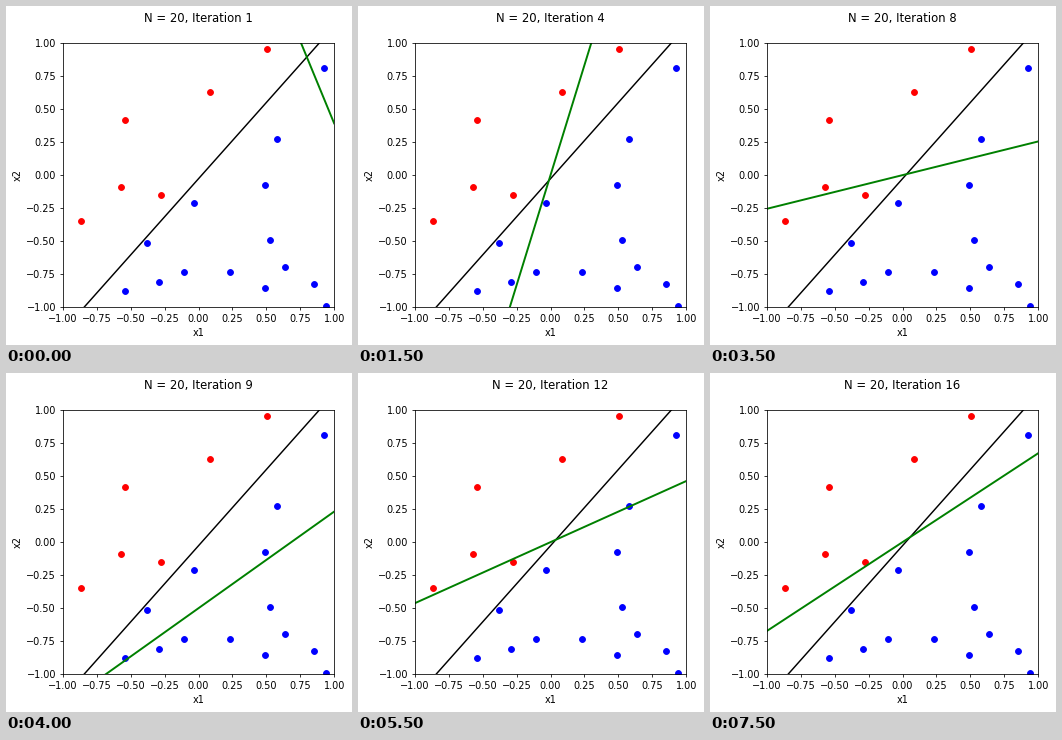
A matplotlib script for the animation above (8 s loop, 346 by 339 pixels).

```python
import numpy as np
import matplotlib.pyplot as plt
from matplotlib.animation import FuncAnimation

W, H, DPI = 346, 339, 70
STEPS = 16
SLOPE, BIAS = 1.153, -0.027

plt.rcParams["font.family"] = "DejaVu Sans"

# The scattered samples. The first six, in visiting order, drive the learning.
POINTS = np.array([
    (-0.864, -0.347), (0.086, 0.63), (0.508, 0.955),
    (-0.541, -0.877), (-0.379, -0.513), (0.925, 0.811),
    (0.58, 0.274), (0.49, -0.075), (-0.033, -0.21), (0.53, -0.49),
    (0.64, -0.695), (0.232, -0.733), (-0.107, -0.733), (-0.29, -0.81),
    (0.49, -0.855), (0.852, -0.823), (0.94, -0.99),
    (-0.54, 0.418), (-0.57, -0.09), (-0.277, -0.15),
])
above = POINTS[:, 1] > SLOPE * POINTS[:, 0] + BIAS
labels = np.where(above, 1, -1)
inputs = np.column_stack([np.ones(len(POINTS)), POINTS])


def train(steps):
    """Weights after each perceptron update, starting from zero."""
    w, history = np.zeros(3), []
    for _ in range(steps):
        wrong = np.flatnonzero(labels * (inputs @ w) <= 0)
        if len(wrong):
            w = w + labels[wrong[0]] * inputs[wrong[0]]
        history.append(w)
    return history


weights = train(STEPS)
xs = np.array([-1.0, 1.0])

# The tiny margin keeps the pixel size from rounding down.
fig = plt.figure(figsize=((W + 1e-6) / DPI, (H + 1e-6) / DPI), dpi=DPI,
                 facecolor="white")
ax = fig.add_axes([56.9 / W, 37.75 / H, 271.25 / W, 264.25 / H])
ax.set(xlim=(-1, 1), ylim=(-1, 1), xlabel="x1", ylabel="x2")
for axis in (ax.xaxis, ax.yaxis):
    axis.set_major_locator(plt.MultipleLocator(0.25))

for group, color in ((above, "red"), (~above, "blue")):
    ax.plot(*POINTS[group].T, "o", color=color)
ax.plot(xs, SLOPE * xs + BIAS, color="black", lw=1.5)
guess, = ax.plot([], [], color="green", lw=2)
title = ax.set_title("")


def update(i):
    w0, w1, w2 = weights[i]
    guess.set_data(xs, -(w0 + w1 * xs) / w2)
    title.set_text(f"N = 20, Iteration {i + 1}\n")
    return guess, title


anim = FuncAnimation(fig, update, frames=STEPS, interval=500,
                     repeat=True, repeat_delay=0, blit=False)
plt.show()
```
